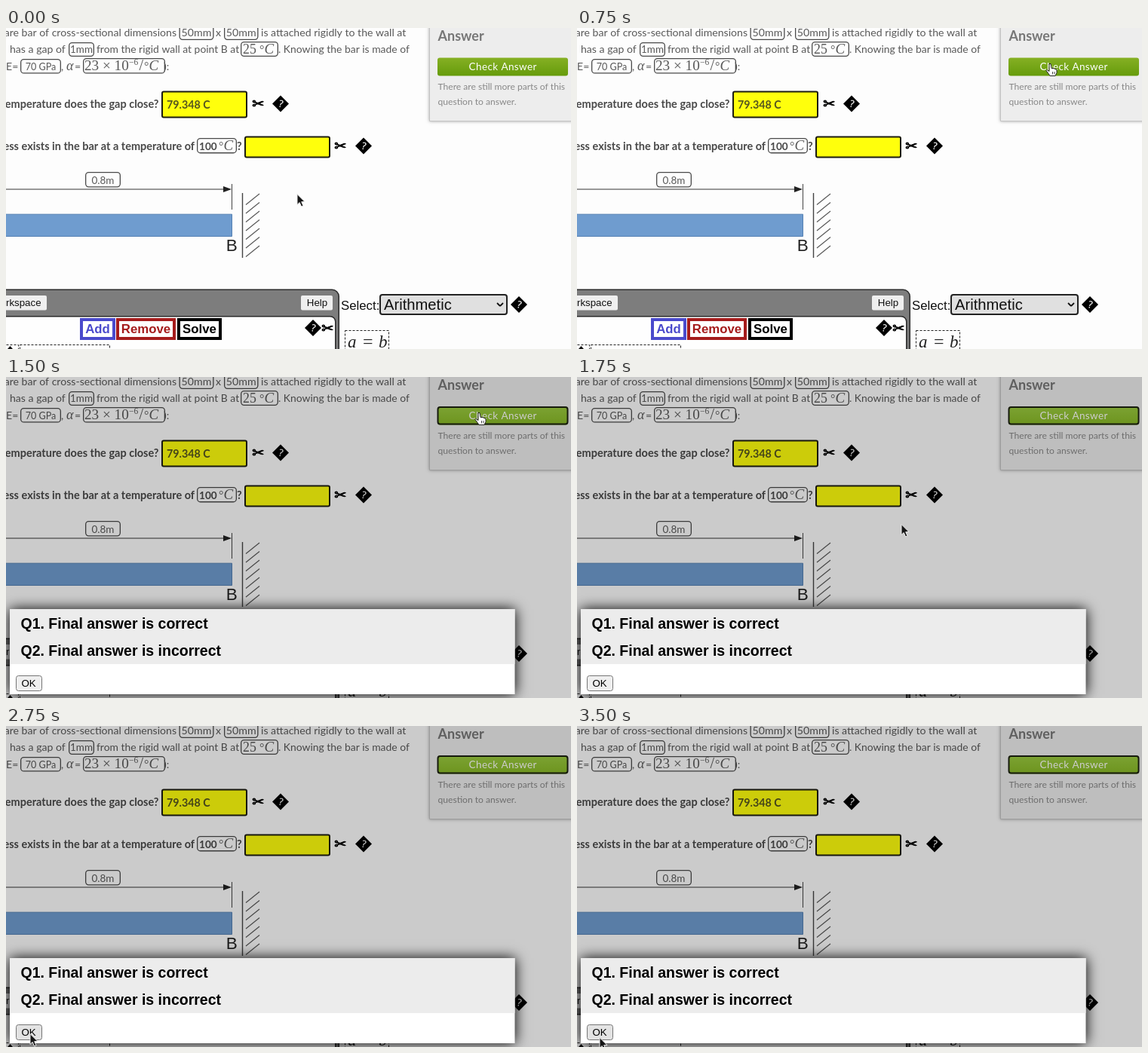
Animation of 749x426 px, one loop 3750 ms. Source, as an HTML page with a canvas:

```html
<!DOCTYPE html>
<html lang="en">
<head>
<meta charset="utf-8">
<title>Thermal stress exercise</title>
<style>
html, body { margin: 0; width: 100%; height: 100%; overflow: hidden; background: #fdfdfd; }
canvas { display: block; }
</style>
</head>
<body>
<canvas id="stage" width="749" height="426"></canvas>
<script>
const ctx = document.getElementById('stage').getContext('2d');
const W = 749, H = 426, LOOP = 3750, STEP = 250;
const BODY = 'Lato, sans-serif';
const SANS = '"Liberation Sans", Arial, sans-serif';
const MATH = '"Liberation Serif", "Times New Roman", serif';
const INK = '#585858';

// Pointer position for each step of the loop
const pointer = [
  [386, 220], [490, 165], [587, 110], [629, 47], [629, 47],
  [629, 47], [629, 47], [430, 195], [150, 360], [70, 399],
  [46, 405], [32, 408], [32, 408], [31, 411], [30, 413]
];

function text(str, x, y, font, color = INK, align = 'left') {
  ctx.font = font;
  ctx.fillStyle = color;
  ctx.textAlign = align;
  ctx.fillText(str, x, y);
}

function line(x1, y1, x2, y2, color = '#333', width = 1) {
  ctx.strokeStyle = color;
  ctx.lineWidth = width;
  ctx.beginPath();
  ctx.moveTo(x1, y1);
  ctx.lineTo(x2, y2);
  ctx.stroke();
}

function poly(points, fill, stroke) {
  ctx.beginPath();
  points.forEach(([x, y]) => ctx.lineTo(x, y));
  ctx.closePath();
  if (fill) { ctx.fillStyle = fill; ctx.fill(); }
  if (stroke) { ctx.strokeStyle = stroke; ctx.lineWidth = 1; ctx.stroke(); }
}

// Rounded box whose border lies inside the given edges
function box(x1, y1, x2, y2, { r = 0, fill, stroke, width = 1 } = {}) {
  const h = stroke ? width / 2 : 0;
  ctx.beginPath();
  ctx.roundRect(x1 + h, y1 + h, x2 - x1 - 2 * h, y2 - y1 - 2 * h, r);
  if (fill) { ctx.fillStyle = fill; ctx.fill(); }
  if (stroke) { ctx.strokeStyle = stroke; ctx.lineWidth = width; ctx.stroke(); }
}

const value = (x1, y1, x2, y2) => box(x1, y1, x2, y2, { r: 4, stroke: '#4a4a4a', width: 1.3 });

function valueText(str, x1, y1, x2, y2, size = 14.2) {
  value(x1, y1, x2, y2);
  text(str, (x1 + x2) / 2, y2 - 5, `${size}px ${BODY}`, INK, 'center');
}

function celsius(x, y) {
  text('°', x, y, `16px ${MATH}`);
  text('C', x + 6.5, y, `italic 19px ${MATH}`);
}

function helpMark(x, y) {
  poly([[x, y - 11], [x + 11, y], [x, y + 11], [x - 11, y]], '#000');
  ctx.save();
  ctx.translate(x, y);
  ctx.rotate(0.25);
  text('?', 0.5, 4.5, '13px "DejaVu Sans", sans-serif', '#fff', 'center');
  ctx.restore();
}

function scissors(x, y) {
  text('✂', x, y + 6, '19px "DejaVu Sans", sans-serif', '#000');
  ctx.strokeStyle = '#000';
  ctx.lineWidth = 0.8;
  ctx.strokeText('✂', x, y + 6);
}

function answerField(x1, y1, x2, y2) {
  box(x1, y1, x2, y2, { r: 2, fill: '#ffff0c', stroke: '#1c1c10', width: 2 });
}

function question() {
  const f = `14.1px ${BODY}`, f2 = `13.9px ${BODY}`, b = `bold 14.5px ${BODY}`;
  text('are bar of cross-sectional dimensions', 226, 11, f, INK, 'right');
  valueText('50mm', 229.5, -4, 275.5, 16);
  text('x', 278, 11, f);
  valueText('50mm', 289, -4, 334.5, 16);
  text('is attached rigidly to the wall at', 338, 11, f);

  text('has a gap of', 5, 33, f);
  valueText('1mm', 83, 19, 117, 38, 13.4);
  text('from the rigid wall at point B at', 120, 33, f2);
  value(311, 18, 361, 38);
  text('25', 314, 34, `17.8px ${MATH}`);
  celsius(336, 34);
  text('. Knowing the bar is made of', 361, 33, f2);

  text('E=', 0, 55.6, f);
  valueText('70 GPa', 19, 41, 73, 60.6, 12.6);
  text(',', 73, 55.6, f);
  text('α', 80, 55.6, `italic 18px ${MATH}`);
  text('=', 91, 55.6, f);
  value(102, 40, 211, 60.6);
  text('23 × 10', 104, 55.6, `19.2px ${MATH}`);
  text('−6', 163, 49, `11.5px ${MATH}`);
  text('/', 176.5, 56, `20px ${MATH}`);
  celsius(183, 55.6);
  text('):', 209, 55.6, f);

  text('emperature does the gap close?', 202.5, 105.6, b, '#484848', 'right');
  answerField(206, 83.5, 320, 119.5);
  text('79.348 C', 213, 106.8, `bold 14.3px ${BODY}`, '#555520');
  scissors(326, 100.5);
  helpMark(364, 100.5);

  text('ess exists in the bar at a temperature of', 250, 161.6, b, '#484848', 'right');
  value(253, 146, 306, 166.4);
  text('100', 256, 161.6, `bold 13.6px ${BODY}`, '#484848');
  celsius(282, 161.6);
  text('?', 306, 161.6, b, '#484848');
  answerField(316, 143.5, 430, 172.5);
  scissors(435, 156.5);
  helpMark(474, 156.5);
}

function diagram() {
  valueText('0.8m', 105, 191, 152, 211.5, 13.5);
  line(0, 214, 289, 214);
  poly([[288, 210], [299, 214], [288, 218]], '#222');
  line(299.5, 207, 299.5, 241, '#444');
  box(-2, 246.7, 300, 277, { fill: '#6f9ccf', stroke: '#5580b3' });
  text('B', 291.8, 296.3, `22.5px ${SANS}`, '#222');
  line(313.5, 219, 313.5, 305, '#444', 1.4);
  for (let i = 0; i < 7; i++) {
    const y = 220 + i * 11.5;
    line(336, y, 318, y + 14.5, '#555', 1.1);
  }
}

function sidebar(pressed, focused) {
  ctx.save();
  ctx.shadowColor = 'rgba(0,0,0,.35)';
  ctx.shadowBlur = 4;
  ctx.shadowOffsetY = 1;
  box(561, -10, 760, 123, { fill: '#ededed' });
  ctx.restore();
  box(561, -10, 760, 124, { stroke: '#c4c4c4' });
  text('Answer', 572.5, 17, `bold 18px ${BODY}`, '#777');

  const g = ctx.createLinearGradient(0, 39, 0, 63);
  const tones = pressed ? ['#6f9520', '#5f880e'] : focused ? ['#9bcb40', '#88b926'] : ['#86b024', '#669c0c'];
  tones.forEach((c, i) => g.addColorStop(i, c));
  box(572, 39.5, 745, 63.5, { r: 3, fill: g });
  if (focused) box(571.5, 39, 745.5, 63.5, { r: 3, stroke: '#1c2010', width: 2 });
  ctx.letterSpacing = '0.4px';
  text('Check Answer', 658.7, 56.4, `13.5px ${BODY}`, '#fff', 'center');
  ctx.letterSpacing = '0px';

  const f = `12.1px ${BODY}`;
  text('There are still more parts of this', 572.5, 82, f, '#888');
  text('question to answer.', 572.5, 102, f, '#888');
}

function frameButton(label, x1, x2, color) {
  box(x1, 385, x2, 414, { fill: '#fff', stroke: color, width: 4 });
  text(label, (x1 + x2) / 2, 405, `bold 16.8px ${SANS}`, color, 'center');
}

function dashed(x1, y1, x2, y2) {
  ctx.setLineDash([3, 2]);
  box(x1, y1, x2, y2, { stroke: '#222' });
  ctx.setLineDash([]);
}

function workspace() {
  box(-20, 346.6, 442, 460, { r: 9, fill: '#7d7d7d', stroke: '#2a2a2a', width: 1.5 });
  box(-20, 382, 437.5, 460, { r: 7, fill: '#fefefe', stroke: '#2a2a2a', width: 1.5 });
  box(-5, 355, 54, 374.5, { r: 2, fill: '#efefef' });
  text('rkspace', 0, 369, `13.3px ${SANS}`, '#111');
  box(391, 355, 433, 374.5, { r: 2, fill: '#efefef' });
  text('Help', 412.5, 369, `13.3px ${SANS}`, '#111', 'center');
  frameButton('Add', 98, 145, '#4a4acc');
  frameButton('Remove', 146, 225, '#a51c1c');
  frameButton('Solve', 227, 286, '#000');
  helpMark(407, 398);
  scissors(418, 399);
  dashed(-5, 420, 17, 450);
  dashed(18, 420, 138, 450);
  poly([[2, 426], [5.5, 422], [9, 426]], '#111');

  text('Select:', 444, 374, `16.8px ${SANS}`, '#111');
  box(495, 353, 665, 381, { r: 3, fill: '#e0e0e0', stroke: '#222', width: 2 });
  text('Arithmetic', 501, 374, `20.2px ${SANS}`, '#111');
  line(651, 365, 655, 369, '#111', 1.8);
  line(655, 369, 659, 365, '#111', 1.8);
  helpMark(680, 367);
  dashed(449, 401, 508, 450);
  text('a', 453, 424, `italic 23px ${MATH}`, '#222');
  text('=', 473, 424, `24px ${MATH}`, '#222');
  text('b', 494, 424, `italic 23px ${MATH}`, '#222');
}

function dialog(hover) {
  ctx.fillStyle = 'rgba(0,0,0,.2)';
  ctx.fillRect(0, 0, W, H);
  ctx.save();
  ctx.shadowColor = '#000';
  ctx.shadowBlur = 17;
  box(5, 308, 674.5, 421, { fill: '#fff' });
  ctx.restore();
  box(5, 308, 674.5, 381, { fill: '#ececec' });
  const f = `bold 19.5px ${SANS}`;
  text('Q1. Final answer is correct', 19.5, 334, f, '#000');
  text('Q2. Final answer is incorrect', 19.5, 370, f, '#000');
  box(13, 396, 48, 417, { r: 3, fill: hover ? '#e3e3e3' : '#efefef', stroke: '#767676' });
  text('OK', 30, 411, `13.3px ${SANS}`, '#000', 'center');
}

function arrow(x, y) {
  ctx.save();
  ctx.translate(x, y + 0.5);
  poly([[0, 0], [0, 14], [3.2, 11], [5.6, 16.5], [8, 15.4], [5.7, 10.2], [10, 10]], '#151515', '#eee');
  ctx.restore();
}

function hand(x, y) {
  ctx.save();
  ctx.translate(x - 1, y + 0.5);
  ctx.lineJoin = 'round';
  poly([[-2, 0], [0, 0], [1, 6], [4, 6], [6, 7], [8, 8], [8, 12], [6, 16],
    [-1, 16], [-3, 13], [-6, 9], [-5, 8], [-2, 10]], '#fff', '#222');
  line(2.5, 10.5, 2.5, 14, '#444');
  line(5, 10.5, 5, 14, '#444');
  ctx.restore();
}

function draw(now) {
  const step = Math.floor((now % LOOP) / STEP);
  ctx.fillStyle = '#fdfdfd';
  ctx.fillRect(0, 0, W, H);
  question();
  diagram();
  sidebar(step === 5, step >= 5);
  workspace();
  if (step >= 6) dialog(step >= 10);
  const [x, y] = pointer[step];
  (step >= 3 && step <= 6 ? hand : arrow)(x, y);
}

const start = performance.now();
function tick() {
  draw(performance.now() - start);
  requestAnimationFrame(tick);
}
tick();
</script>
</body>
</html>
```
